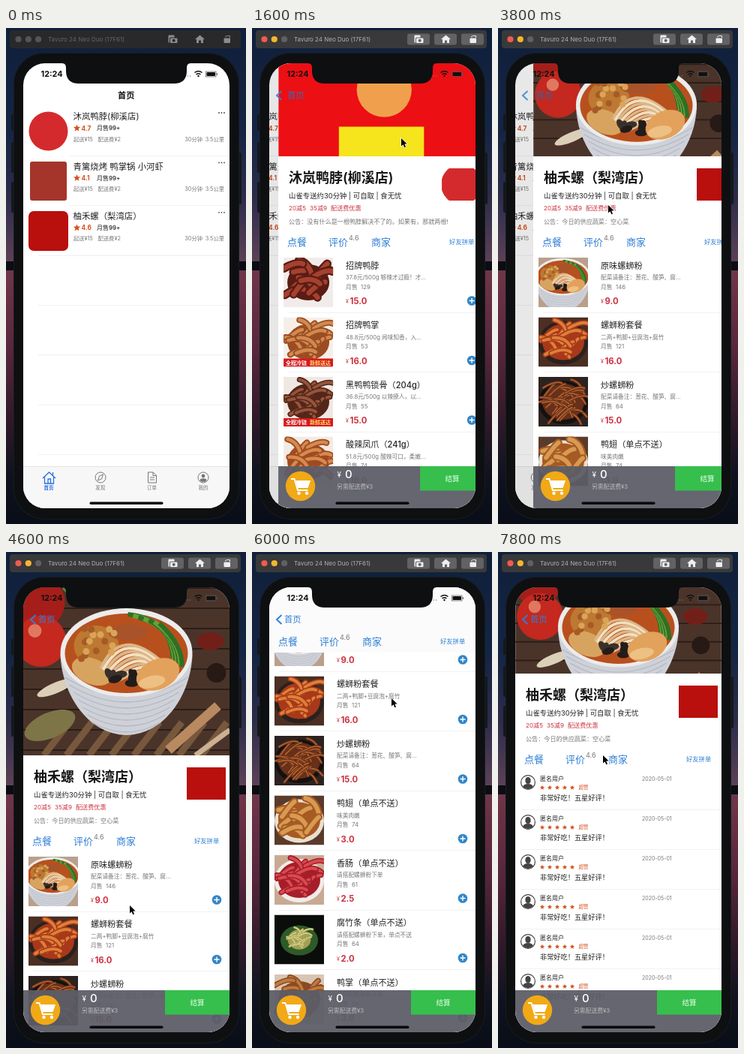
These frames come from a looping animation (320x661 px, 8000 ms). An HTML page with a canvas:

```html
<!DOCTYPE html>
<html lang="zh-CN">
<head>
<meta charset="utf-8">
<style>
html, body { margin: 0; width: 100%; height: 100%; overflow: hidden; background: #0b0f1c; }
canvas { display: block; width: 320px; height: 661px; }
</style>
</head>
<body>
<canvas id="stage"></canvas>
<script>
const W = 320, H = 661, LOOP = 8000, STEP = 200;
const SCREEN = { x: 23, y: 47, w: 275, h: 593 };
const BLUE = '#2f7fd6', RED = '#cc3340', GREY = '#777', STAR = '#d4501e';
const canvas = document.getElementById('stage');
const dpr = window.devicePixelRatio || 1;
canvas.width = W * dpr;
canvas.height = H * dpr;
const c = canvas.getContext('2d');

const shops = [
  {
    name: '沐岚鸭脖(柳溪店)', rating: '4.7', notice: '没有什么是一根鸭脖解决不了的。如果有，那就两根!',
    items: [
      ['招牌鸭脖', '37.8元/500g 够辣才过瘾！才…', 129, '15.0', { bg: '#f1ecea', base: '#5a1c14', top: '#a5412f', n: 14, wide: 10 }],
      ['招牌鸭掌', '48.8元/500g 闻味知香，入…', 53, '16.0', { bg: '#f6efe8', base: '#9c4c22', top: '#d08a50', n: 16, wide: 7, strip: true }],
      ['黑鸭鸭锁骨（204g）', '36.8元/500g 以辣撩人，以…', 55, '15.0', { bg: '#efe8e2', base: '#54261a', top: '#96553a', n: 16, wide: 6, strip: true }],
      ['酸辣凤爪（241g）', '51.8元/500g 酸辣可口，柔嫩…', 74, '16.0', { bg: '#f3ebe3', base: '#9f4b22', top: '#d68a4e', n: 15, wide: 7 }]
    ]
  },
  { name: '青篱烧烤 鸭掌锅 小河虾', rating: '4.1' },
  {
    name: '柚禾螺（梨湾店）', rating: '4.6', notice: '今日的供应蔬菜：空心菜',
    items: [
      ['原味螺蛳粉', '配菜请备注：葱花、酸笋、腐…', 146, '9.0', { bg: '#b9a08c', bowl: true }],
      ['螺蛳粉套餐', '二两+鸭脚+豆腐泡+腐竹', 121, '16.0', { bg: '#4a2f22', base: '#a8381a', top: '#dd8038', n: 16, wide: 6, plate: '#2b211d' }],
      ['炒螺蛳粉', '配菜请备注：葱花、酸笋、腐…', 64, '15.0', { bg: '#2c2220', base: '#66301a', top: '#b4622e', n: 32, wide: 2.5, plate: '#15110f' }],
      ['鸭翅（单点不送）', '味美肉嫩', 74, '3.0', { bg: '#5a3b2b', base: '#a65a24', top: '#d89a50', n: 10, wide: 9, plate: '#eadfcf' }],
      ['香肠（单点不送）', '请搭配螺蛳粉下单', 61, '2.5', { bg: '#c8aa93', base: '#a51e2a', top: '#d94a50', n: 16, wide: 6, plate: '#f1ece8' }],
      ['腐竹条（单点不送）', '请搭配螺蛳粉下单，单点不送', 64, '2.0', { bg: '#0b0d0a', base: '#a3a054', top: '#dbd58e', n: 16, wide: 4, plate: '#2e5a2a', small: true }],
      ['鸭掌（单点不送）', '请搭配螺蛳粉下单', 58, '3.0', { bg: '#d8c6b4', base: '#8a4a24', top: '#c07a3c', n: 14, wide: 6 }]
    ]
  }
];

// [time, value...] keyframes
const cursorKeys = [[400, 262, 340], [1100, 200, 152], [1800, 200, 152], [2200, 28, 136], [2600, 84, 118],
  [2900, 160, 128], [3400, 148, 241], [3900, 148, 241], [4100, 160, 270], [4600, 166, 476], [4800, 168, 476],
  [5200, 170, 420], [6000, 187, 200], [6200, 187, 200], [7000, 180, 411], [7300, 104, 276], [7500, 104, 276], [7800, 141, 276]];
const scrollKeys = [[4100, 0], [4600, -100], [4700, -90], [5000, -5], [5200, 0], [6000, 220], [6200, 220], [7000, 9]];
const swipeKeys = [[2200, 0], [2600, 97], [2800, 225], [3000, 275]];

const clamp = v => Math.max(0, Math.min(1, v));
const noise = n => { const v = Math.sin(n * 91.7 + 3.1) * 4357.5; return v - Math.floor(v); };

function track(keys, t) {
  if (t <= keys[0][0]) return keys[0].slice(1);
  for (let i = 1; i < keys.length; i++) {
    const a = keys[i - 1], b = keys[i];
    if (t <= b[0]) {
      const u = (t - a[0]) / (b[0] - a[0]), e = u * u * (3 - 2 * u);
      return a.slice(1).map((v, k) => v + (b[k + 1] - v) * e);
    }
  }
  return keys[keys.length - 1].slice(1);
}

// critically damped spring: share of the push still to go
function remaining(ms) {
  if (ms <= 0) return 1;
  const k = 14 * ms / 1000, r = (1 + k) * Math.exp(-k);
  return r < 0.005 ? 0 : r;
}

function pageOffset(t) {
  if (t < 2200) return SCREEN.w * remaining(t - 1250);
  if (t < 3500) return track(swipeKeys, t)[0];
  return SCREEN.w * remaining(t - 3510);
}

function text(s, x, y, size, color, weight = 400, align = 'left') {
  c.font = `${weight} ${size}px Inter, "Noto Sans CJK SC", "Noto Sans CJK JP", sans-serif`;
  c.textAlign = align;
  c.fillStyle = color;
  c.fillText(s, x, y + size * 0.36);
}
function rect(x, y, w, h, color, r = 0) {
  c.fillStyle = color;
  c.beginPath();
  c.roundRect(x, y, w, h, r);
  c.fill();
}
function ellipse(x, y, rx, ry, color, turn = 0) {
  c.fillStyle = color;
  c.beginPath();
  c.ellipse(x, y, rx, ry, turn, 0, 7);
  c.fill();
}
const disc = (x, y, r, color) => ellipse(x, y, r, r, color);
function path(d, color, width = 1) {
  c.strokeStyle = color;
  c.lineWidth = width;
  c.stroke(new Path2D(d));
}
const line = (x1, y, x2, color = '#e6e6e8') => rect(x1, y, x2 - x1, 0.6, color);
function group(x, y, scale, draw) {
  c.save();
  c.translate(x, y);
  c.scale(scale, scale);
  draw();
  c.restore();
}
function clipped(x, y, w, h, draw, r = 0) {
  c.save();
  c.beginPath();
  c.roundRect(x, y, w, h, r);
  c.clip();
  draw();
  c.restore();
}
function star(x, y, r) {
  c.fillStyle = STAR;
  c.beginPath();
  for (let i = 0; i < 10; i++) {
    const a = i * Math.PI / 5 - Math.PI / 2, q = i % 2 ? r * 0.45 : r;
    c.lineTo(x + q * Math.cos(a), y + q * Math.sin(a));
  }
  c.fill();
}

function noodleBowl() {
  c.fillStyle = '#cfd1d8';
  c.fill(new Path2D('M-88 -22C-86 30-52 84 0 85C52 84 86 30 88 -22Z'));
  for (let i = 0; i < 7; i++) path(`M${-82 + i * 6} ${8 + i * 10}Q0 ${58 + i * 6} ${82 - i * 6} ${8 + i * 10}`, '#b4b8c4', 1.3);
  ellipse(0, -25, 88, 59, '#ececec');
  ellipse(0, -24, 82, 53, '#b8501e');
  ellipse(-40, -34, 30, 27, '#bd7832');
  ellipse(-46, 0, 28, 17, '#d7a460', 0.4);
  for (let i = 0; i < 9; i++) {
    path(`M${-34 + i * 3} ${-4 + i * 2}Q${-8 + i * 6} ${-62 + i * 6} ${48 - i * 2} ${-12 + i * 3}`, i % 2 ? '#f3e0c0' : '#dcb689', 4);
  }
  ellipse(2, -52, 26, 11, '#a8532a');
  for (let i = 0; i < 16; i++) disc(-62 + noise(i) * 46, -58 + noise(i + 20) * 42, 4.5, i % 2 ? '#d9a458' : '#a65a26');
  for (let i = 0; i < 7; i++) path(`M${2 + i * 7} ${-76 + i * 2}Q${58 + i * 3} ${-70 + i * 6} ${62 + i * 2} ${-18 + i * 2}`, i % 2 ? '#69a03a' : '#2d7024', 6);
  for (let i = 0; i < 7; i++) ellipse(-24 + noise(i + 5) * 34, 2 + noise(i + 9) * 14, 9, 5, i % 2 ? '#3a302b' : '#221c1a', i);
  ellipse(42, 4, 30, 20, '#e2a25c', -0.4);
  ellipse(34, 14, 18, 8, '#edc083', -0.2);
}

function noodlePhoto() {
  rect(-150, -115, 300, 230, '#4a342a');
  for (let i = 0; i < 9; i++) rect(-150, -112 + i * 27, 300, 2, '#2b1d18');
  for (let i = 0; i < 8; i++) path(`M${-110 + i * 30} 112l34-44`, '#78583c', 9);
  disc(-118, -92, 36, '#a61e1a');
  disc(-114, -40, 34, '#c4281e');
  disc(-122, -54, 9, '#e07860');
  for (let i = 0; i < 6; i++) path(`M${-84 + i * 9} -112Q${-70 + i * 6} -96 ${-50 + i * 10} -88`, i % 2 ? '#d9dcc8' : '#56843a', 5);
  ellipse(112, -40, 18, 12, '#712019');
  disc(120, 2, 13, '#271915');
  ellipse(-102, 72, 36, 17, '#7d7548', -0.4);
  ellipse(-94, 22, 27, 7, '#dccfb8', -0.4);
  path('M56 105L122 46', '#b98a60', 13);
  path('M92 112L138 78', '#cbb091', 7);
  noodleBowl();
}

function mascotBanner() {
  rect(-150, -115, 300, 230, '#ec0f14');
  disc(4, -47, 40, '#f0a04c');
  rect(-62, 7, 124, 124, '#f6e51c');
}

function dish(p, x, y) {
  clipped(x, y, 66, 66, () => {
    rect(x, y, 66, 66, p.bg);
    if (p.bowl) return group(x + 32, y + 36, 0.42, noodleBowl);
    if (p.plate) ellipse(x + 33, y + 34, p.small ? 25 : 33, p.small ? 20 : 29, p.plate);
    group(x + 33, y + 33, p.small ? 0.55 : 1, () => {
      ellipse(0, 0, 28, 24, p.base);
      c.lineCap = 'round';
      for (let i = 0; i < p.n; i++) {
        const px = (noise(i + p.n) - 0.5) * 42, py = (noise(i + 40) - 0.5) * 44;
        const a = noise(i + 70) * 1.8 - 0.9, dx = 13 * Math.cos(a), dy = 13 * Math.sin(a);
        const d = `M${px - dx} ${py - dy}Q${px + 4} ${py - 7} ${px + dx} ${py + dy}`;
        path(d, p.base, p.wide + 1.2);
        path(d, p.top, p.wide * 0.65);
      }
      c.lineCap = 'butt';
    });
    if (p.strip) {
      rect(x, y + 55, 66, 11, '#d61a1e');
      text('全程冷链', x + 17, y + 60.5, 7, '#fff', 700, 'center');
      text('新鲜送达', x + 49, y + 60.5, 7, '#ffe36b', 700, 'center');
    }
  });
}

function wallpaper() {
  const g = c.createLinearGradient(0, 0, 0, H);
  [[0, '#10203a'], [0.2, '#142444'], [0.34, '#2c2c4a'], [0.465, '#5a4056'], [0.5, '#6f3448'],
    [0.65, '#58263b'], [0.78, '#331a2b'], [0.9, '#10131f'], [1, '#080d17']].forEach(s => g.addColorStop(...s));
  c.fillStyle = g;
  c.fillRect(0, 0, W, H);
  rect(0, 311, W, 12, '#0c0c13');
}

function titleBar(active) {
  rect(5, 3, 308, 24, active ? '#39393b' : '#29292c', 4);
  ['#ee5b50', '#f3b72f', '#606063'].forEach((col, i) => disc(16.5 + i * 13.3, 15, 4.1, active ? col : '#555559'));
  text('Tavuro 24 Neo Duo (17F61)', 56, 15, 8, active ? '#b2b2b4' : '#656568');
  const ink = active ? '#eeeeef' : '#8b8b8d', back = active ? '#626265' : '#29292c';
  [207, 243, 279].forEach(x => rect(x, 7.5, 30, 15, back, 3));
  rect(216.5, 9.5, 8, 10, ink, 1);
  rect(218, 12.5, 11, 8, back, 1.5);
  rect(219, 13.5, 9.5, 6.5, ink, 1);
  disc(223.7, 16.8, 2, back);
  c.fillStyle = ink;
  c.fill(new Path2D('M252 15L258.500 9.500L265 15H263V20H260V16.500H257V20H254V15Z'));
  rect(290.5, 13.5, 8.5, 6.5, ink, 1);
  path('M292 12Q294 9.500 298.500 10.500V13', ink, 1);
}

function phoneBody() {
  [[115, 22], [152, 41], [205, 41]].forEach(([y, h]) => rect(7, y, 5, h, '#14181c', 2));
  rect(309, 166, 5, 69, '#14181c', 2);
  rect(10, 33, 301, 622, '#171c1f', 41);
  rect(11, 34, 299, 620, '#0d0f11', 40);
}

function homePage() {
  rect(23, 47, 275, 593, '#fff');
  for (let i = 0; i < 7; i++) line(i < 2 ? 84 : 43, 170 + i * 66.4, 298);
  disc(56.500, 137.500, 26, '#d42a2d');
  rect(32, 178, 49, 52, '#a5352a', 3);
  rect(30, 244, 53, 53, '#b90f0d', 7);
  shops.forEach((s, i) => {
    const y = 118 + i * 66.4;
    text(s.name, 89.500, y, 11.4, '#222');
    [284, 287.5, 291].forEach(x => disc(x, y - 5, 0.9, '#444'));
    star(94.5, y + 15.5, 4.8);
    text(s.rating, 100.500, y + 15.5, 8.4, STAR, 700);
    text('月售99+', 121, y + 15.5, 8, '#222', 500);
    text('起送¥15', 90, y + 30, 7.3, GREY);
    text('配送费¥2', 122.5, y + 30, 7.3, GREY);
    text('30分钟', 262, y + 30, 7.3, GREY, 400, 'right');
    text('3.5公里', 291, y + 30, 7.3, GREY, 400, 'right');
  });
  rect(23, 584, 275, 56, '#f7f7f8');
  line(23, 584, 298, '#d0d0d2');
  ['首页', '发现', '订单', '我的'].forEach((s, i) => text(s, 57 + i * 68.7, 613, 6.5, i ? '#777' : '#2a72e0', i ? 400 : 600, 'center'));
  path('M49 600L57.500 592L66 600M51.500 598V607H63.500V598M56 607V601H59.500V607M62.500 596V592', '#2a72e0', 1.3);
  path('M133 599A7 7 0 1 1 119 599A7 7 0 1 1 133 599M122.500 603L124.500 597L129.500 595L127.500 601Z', '#777');
  path('M189.500 592H196L200.500 596V606H189.500ZM196 592V596.500H200M192 599H198M192 602H198', '#777');
  path('M270 599A7 7 0 1 1 256 599A7 7 0 1 1 270 599', '#777');
  disc(263, 597, 2.4, '#777');
  ellipse(263, 602.5, 4.3, 2.3, '#777');
}

function menuList(shop, scroll) {
  shop.items.forEach(([name, desc, sold, price, photo], i) => {
    const y = 306 + i * 79.5 - scroll;
    if (y > 590 || y < 30) return;
    dish(photo, 30, y);
    text(name, 113, y + 11, 11.1, '#222', 500);
    text(desc, 113, y + 26.5, 7.7, GREY);
    text('月售  ' + sold, 113, y + 39, 7.8, GREY);
    text('¥', 113, y + 58.5, 7, RED);
    text(price, 118.5, y + 58, 11.3, RED, 700);
    disc(281, y + 57.5, 6.3, '#3286c7');
    path(`M277.500 ${y + 57.5}h7m-3.500-3.500v7`, '#fff', 1.4);
    line(36, y + 73, 298);
  });
}

function reviewList(tabY) {
  for (let i = 0; i < 6; i++) {
    const y = tabY + 26 + i * 53;
    disc(40, y + 5, 10, '#444');
    disc(40, y + 5, 8.8, '#fff');
    clipped(31, y - 4, 18, 18, () => {
      ellipse(40, y + 2.5, 3.6, 4.5, '#444');
      ellipse(40, y + 11.5, 7, 4.5, '#444');
    }, 9);
    text('匿名用户', 56, y, 8, '#222', 500);
    text('2020-05-01', 192, y, 7, GREY);
    for (let k = 0; k < 5; k++) star(59 + k * 10, y + 12, 3.3);
    text('超赞', 107.500, y + 12, 6.5, STAR);
    text('非常好吃！五星好评！', 56, y + 25.5, 9.2, '#222');
    line(30, y + 41, 298);
  }
}

// cover fit, anchored above the middle of the photo
function shopBanner(shop, scroll) {
  const h = Math.max(57, 124 - scroll), photoH = Math.max(205, h);
  const middle = 47 + h / 2 + (photoH - h) * 0.2;
  clipped(23, 47, 275, h, () => group(160.5, middle, photoH / 224, shop === shops[0] ? mascotBanner : noodlePhoto));
}

function cartBar() {
  rect(23, 584, 275, 56, 'rgba(92,93,102,.94)');
  disc(52.500, 610.500, 19.7, '#f1a916');
  path('M40 601H44.500L49 616H62.500', '#fff', 2);
  c.fillStyle = '#fff';
  c.fill(new Path2D('M46 603H66L62.500 613H49Z'));
  disc(50.5, 620, 2.2, '#fff');
  disc(61, 620, 2.2, '#fff');
  text('¥', 101.500, 595.5, 10, '#fff');
  text('0', 112, 595, 15, '#fff', 500);
  text('另需配送费¥3', 101, 611, 7.8, '#bcbcc0');
  rect(212, 584, 86, 32.5, '#36bf4d');
  text('结算', 255, 600.5, 9.6, '#e8ffe9', 400, 'center');
}

function shopPage(shop, scroll, reviews) {
  const tabY = 285 - Math.min(scroll, 166), y = 171 - scroll;
  rect(23, 47, 275, 593, '#fff');
  shopBanner(shop, scroll);
  rect(23, Math.max(y, 47), 275, 600, '#fff');
  text(shop.name, 37, y + 29, 18, '#151515', 600);
  text('山雀专送约30分钟 | 可自取 | 食无忧', 37, y + 53, 9.4, '#222');
  text('20减5', 37, y + 69.5, 8.1, RED);
  text('35减9', 65, y + 69.5, 8.1, RED);
  text('配送费优惠', 93, y + 69.5, 8.1, RED);
  text('公告：' + shop.notice, 37, y + 87, 8.1, GREY);
  clipped(241, y + 16, 52, 43, () => {
    if (shop === shops[0]) disc(267, y + 37.5, 27, '#d42a2d');
    else rect(241, y + 16, 52, 43, '#b90f0d');
  });
  clipped(23, tabY + 15, 275, 600, () => reviews ? reviewList(tabY) : menuList(shop, scroll));
  const bar = clamp((scroll - 30) / 60);
  if (bar) {
    c.globalAlpha = bar;
    rect(23, 47, 275, 57, '#fbfbfb');
    c.globalAlpha = 1;
  }
  if (scroll > 150) rect(23, tabY - 15, 275, 30, '#fbfbfb');
  text('点餐', 35, tabY, 13, BLUE);
  text('评价', 90, tabY, 13, BLUE);
  text('4.6', 117, tabY - 5, 9, GREY);
  text('商家', 147, tabY, 13, BLUE);
  text('好友拼单', 251, tabY, 8.3, BLUE);
  cartBar();
}

function navigation(p) {
  const x = 43 + p * (p < 0.5 ? 90 : 106);
  c.globalAlpha = clamp(1 - p * 1.8);
  path('M39.500 84L33 90L39.500 96', BLUE, 1.9);
  text('首页', x, 90, 11.2, BLUE);
  c.globalAlpha = clamp(p * 1.4);
  text('首页', x, 90, 11.2, '#151515', 700);
  c.globalAlpha = 1;
}

function statusBar() {
  text('12:24', 61, 61.5, 10.8, '#111', 700, 'center');
  for (let i = 0; i < 4; i++) disc(236 + i * 3.2, 64, 0.7, '#777');
  path('M251.500 59.500Q256.500 55.500 261.500 59.500M253.500 62Q256.500 59.500 259.500 62', '#111', 1.5);
  disc(256.5, 64, 1.2, '#111');
  c.strokeStyle = '#555';
  c.lineWidth = 0.7;
  c.strokeRect(266.5, 58, 13.5, 7);
  rect(267.5, 59, 11.5, 5, '#111', 1);
  rect(280.8, 60.3, 1.2, 2.5, '#555');
}

function notch() {
  c.fillStyle = '#0d0f11';
  c.fill(new Path2D('M75 45V47Q80 47 80 53V57Q80 74 97 74H224Q241 74 241 57V53Q241 47 246 47V45Z'));
}

function pointer(x, y) {
  const arrow = new Path2D('M0 0V10.500L2.500 8.300L4.300 12.200L6 11.400L4.300 7.600H7.600Z');
  group(x - 1, y - 5, 1, () => {
    c.strokeStyle = '#fff';
    c.lineWidth = 1.2;
    c.stroke(arrow);
    c.fillStyle = '#000';
    c.fill(arrow);
  });
}

function draw(t) {
  const offset = pageOffset(t), p = offset / SCREEN.w, scroll = track(scrollKeys, t)[0];
  c.setTransform(dpr, 0, 0, dpr, 0, 0);
  wallpaper();
  titleBar(t >= 800);
  phoneBody();
  clipped(SCREEN.x, SCREEN.y, SCREEN.w, SCREEN.h, () => {
    if (p > 0) {
      group(-82 * (1 - p), 0, 1, homePage);
      rect(23, 47, 275, 593, `rgba(0,0,0,${0.1 * (1 - p)})`);
    }
    if (p < 1) group(offset, 0, 1, () => shopPage(t < 3400 ? shops[0] : shops[2], scroll, t >= 7400));
    navigation(p);
    statusBar();
    rect(111.500, 631.500, 98, 3.4, '#090909', 1.7);
  }, 29);
  notch();
  if (t >= 400) pointer(...track(cursorKeys, t));
}

const start = performance.now();
function frame() {
  const t = (performance.now() - start) % LOOP;
  draw(Math.floor(t / STEP) * STEP);
  requestAnimationFrame(frame);
}
frame();
</script>
</body>
</html>
```
